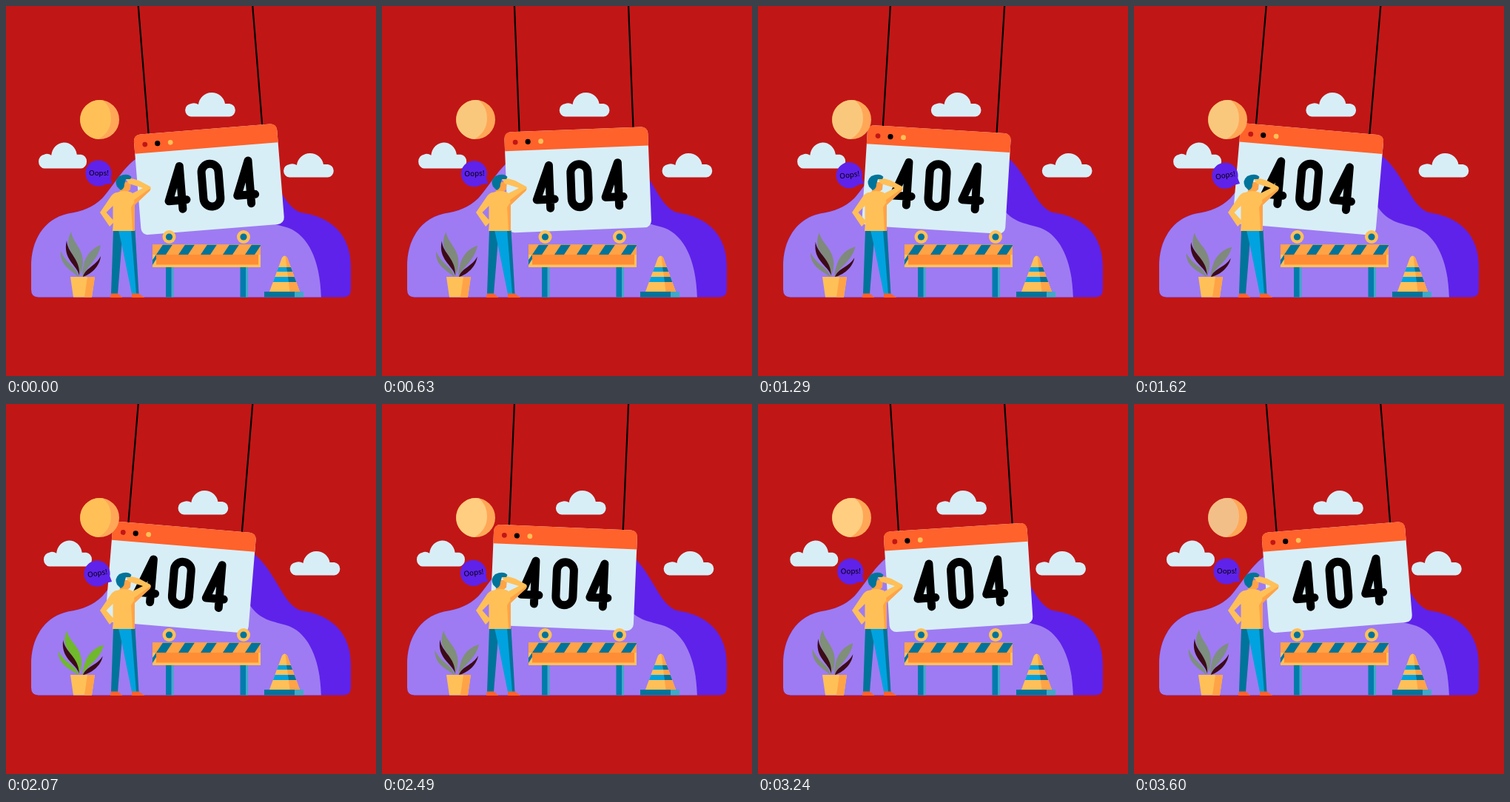
These frames come from a looping animation (500 by 500 pixels, 3.63 s). An HTML page:

```html
<!DOCTYPE html>
<html lang="en">
<head>
<meta charset="utf-8">
<title>404</title>
<style>
  html, body { margin: 0; width: 100%; height: 100%; overflow: hidden; background: #c11616; }
  svg { display: block; width: 100vw; height: 100vh; }
  .yellow { fill: #ffc058; } .amber { fill: #ffa347; } .orange { fill: #ff622b; }
  .teal { fill: #00749a; } .blue { fill: #00a3df; } .aqua { fill: #3fa9c9; }
  .violet { fill: #5f22ea; } .lilac { fill: #9e7bf2; } .ice { fill: #d8eef7; }
  .maroon { fill: #3c0b16; }
  .digits { fill: none; stroke: #000; stroke-width: 11; stroke-linecap: round; stroke-linejoin: round; }
  text { font: 9.8px "Noto Sans", sans-serif; text-anchor: middle; }
</style>
</head>
<body>
<svg viewBox="0 0 500 500">
  <defs>
    <clipPath id="ground"><path d="M44 393.500Q34 393.500 34 383V352C34 318 50 288 84 280.500C104 277 116 273 130 260C147 241 158 218 178 205C230 172 300 172 338 205C366 230 374 270 398 279C436 284 466 306 466 352V383Q466 393.500 456 393.500Z"/></clipPath>
    <clipPath id="board"><path d="M198 322.500H344V336H198Z"/></clipPath>
    <clipPath id="coneShape"><path d="M356 386L373 340Q376.500 335 380 340L397 386Z"/></clipPath>
    <path id="cloud" class="ice" d="M9 32.500A8.800 8.800 0 0 1 9 15Q14 13 19 16A18.200 18.200 0 0 1 55 15H61A8.800 8.800 0 0 1 61 32.500Z"/>
    <g id="four"><path d="M12 17.500H-12L6 -28.500V29.500"/></g>
    <g id="lamp"><circle r="9" class="yellow"/><circle r="4.600" class="teal"/></g>
    <g id="post"><path fill="#007cab" d="M0 352H10V393.500H0Z"/><path class="aqua" d="M7.500 352H10.500V393.500H7.500Z"/></g>
  </defs>

  <g clip-path="url(#ground)">
    <rect width="500" height="400" class="violet"/>
    <path class="lilac" d="M0 400V100H300L325 264C340 294 362 293 382 300C408 310 426 344 426 400Z"/>
  </g>

  <use href="#cloud" id="cloudTop"/>
  <use href="#cloud" id="cloudLeft"/>
  <use href="#cloud" id="cloudRight"/>

  <g id="sign">
    <path d="M-77 -30V168M77 -30V168" stroke="#000" stroke-width="2.200"/>
    <rect x="-97.500" y="167" width="194" height="136" rx="9" class="ice"/>
    <path class="orange" d="M-97.500 192.500V176Q-97.500 167 -88.500 167H87.500Q96.500 167 96.500 176V192.500Z"/>
    <circle cx="-83" cy="181" r="3.400" fill="#c11616"/>
    <circle cx="-66" cy="181" r="3.600"/>
    <circle cx="-48.500" cy="181" r="3.400" class="yellow"/>
    <g class="digits" role="img" aria-label="404" transform="translate(1.500 242.500)">
      <use href="#four" x="-46.500"/>
      <rect x="-11.500" y="-28.500" width="23" height="58" rx="11.500"/>
      <use href="#four" x="46.500"/>
    </g>
  </g>

  <circle cx="126.500" cy="153.500" r="26.500" fill="#ffa757"/>
  <path id="sun" d="M131 127.400A26.500 26.500 0 1 0 125 180Q142 170 142 152Q142 136 131 127.400Z"/>

  <g id="bubble">
    <circle cx="125" cy="226" r="17.600" class="violet"/>
    <path class="violet" d="M132 241L143 240L141 230Z"/>
    <text x="125.500" y="229">Oops!</text>
  </g>

  <g id="plant">
    <g id="leafLeft">
      <path d="M88 305C90 320 105 328 104 348C103 356 101 361 99 366C100 345 86 335 84 321C84 314 86 309 88 305Z"/>
      <path class="maroon" d="M82 317C83 334 101 342 99 364C96 350 76 342 82 317Z"/>
      <path d="M74 331C72 350 89 358 98 366C96 352 82 350 74 331Z"/>
    </g>
    <g id="leafRight">
      <path d="M128 323C116 327 107 338 105 350C103 357 103 362 104 366C108 352 124 345 128 323Z"/>
      <path class="maroon" d="M128 338C127 352 114 363 104 366C107 354 121 352 128 338Z"/>
    </g>
  </g>
  <path class="yellow" d="M87 366H120L116 393.500H91Z"/>
  <path class="amber" d="M110 366H120L116 393.500H106Z"/>

  <g id="man">
    <path class="teal" d="M145 303H158L151 389H142Z"/>
    <path class="blue" d="M152 303H172L179 389H170L157 325Z"/>
    <path class="teal" d="M169 303H174.500L179.500 389H176Z"/>
    <path class="orange" d="M142 388.500H151L157.500 394H141ZM170 388.500H179L187.500 394H170Z"/>
    <path class="amber" d="M155 238H169L168 248L163 252V258H153Z"/>
    <path class="yellow" fill-rule="evenodd" d="M150 252Q160 248 170 252L174 260V304H144L145 293L140 298L127 279L142 257Q146 252 150 252ZM144.500 270V289L135.500 279Z"/>
    <path class="amber" d="M174 264L169 272L171 304H174Z"/>
    <path class="yellow" d="M162 234Q167 231 180 236L195 244Q197 247 194 250L174 268L169 254L185 246L166 240Z"/>
    <path class="amber" d="M173 262L194 247Q196 248 194 250L174 269Z"/>
    <path class="teal" d="M150 244Q146 236 153 230Q164 225 169.500 231L168 234L162 234L160 241Q160 247 155 249Z"/>
  </g>

  <use href="#post" x="216"/><use href="#post" x="316.500"/>
  <use href="#lamp" x="220.500" y="312"/><use href="#lamp" x="321" y="312"/>
  <path class="yellow" d="M198 322.500H344V353H198Z"/>
  <path class="amber" d="M198 322.500H344V336H198Z"/>
  <path fill="#ff8d35" d="M203 336H341V349.500H203Z"/>
  <g id="stripes" class="teal" clip-path="url(#board)"></g>
  <path class="teal" d="M198 350V343L203 336V342Z"/>

  <g clip-path="url(#coneShape)">
    <path class="yellow" d="M350 330H400V390H350Z"/>
    <path class="amber" d="M376.500 330H400V390H384Z"/>
    <path class="blue" d="M350 353H400V359H350ZM350 366H400V373H350Z"/>
    <path class="teal" d="M379 353H400V359H380ZM381 366H400V373H382Z"/>
  </g>
  <path class="teal" d="M349 386H402V393.500H349Z"/>
  <path class="aqua" d="M390 386H402V393.500H390Z"/>
</svg>
<script>
  const LOOP = 3630;
  const $ = id => document.getElementById(id);
  const set = (id, transform) => $(id).setAttribute('transform', transform);

  // Goes 0 to 1 and back once per loop, quadratic ease in and out.
  function swing(t, lead = 0) {
    const p = ((t + lead) % LOOP) / LOOP * 2;
    const x = p < 1 ? p : 2 - p;
    return x < .5 ? 2 * x * x : 1 - 2 * (1 - x) ** 2;
  }

  // Start time, sun colour, leaf colour
  const tints = [
    [0, '#ffc058', '#7d8f80'], [315, '#f9c87c', '#7f8a7c'],
    [1845, '#ffc058', '#70b82c'], [2490, '#ffce80', '#7f8f78'], [3255, '#f3bf88', '#7d8f80']
  ];

  for (let x = 212; x < 350; x += 30)
    $('stripes').innerHTML += `<path d="M${x} 322.500h13l-9 13.500h-13z"/>`;

  function draw(t) {
    const s = swing(t);
    set('sign', `translate(256 0) rotate(${-4.6 + 9.75 * s})`);
    set('cloudTop', `translate(${241 - 10 * s} 117)`);
    set('cloudLeft', `translate(${42.2 + 10 * swing(t, 360)} 184.500) scale(.96 1.080)`);
    set('cloudRight', `translate(${373.8 + 9.7 * swing(t, 150)} 199)`);
    set('bubble', `rotate(${-10 * s} 143 239.500)`);
    set('leafLeft', `rotate(${-6 * s} 100 366)`);
    set('leafRight', `rotate(${6 * s} 103 366)`);
    const [, sun, leaf] = tints.findLast(([start]) => t >= start);
    $('sun').setAttribute('fill', sun);
    $('plant').setAttribute('fill', leaf);
  }

  function tick() {
    draw(performance.now() % LOOP);
    requestAnimationFrame(tick);
  }
  tick();
</script>
</body>
</html>
```
